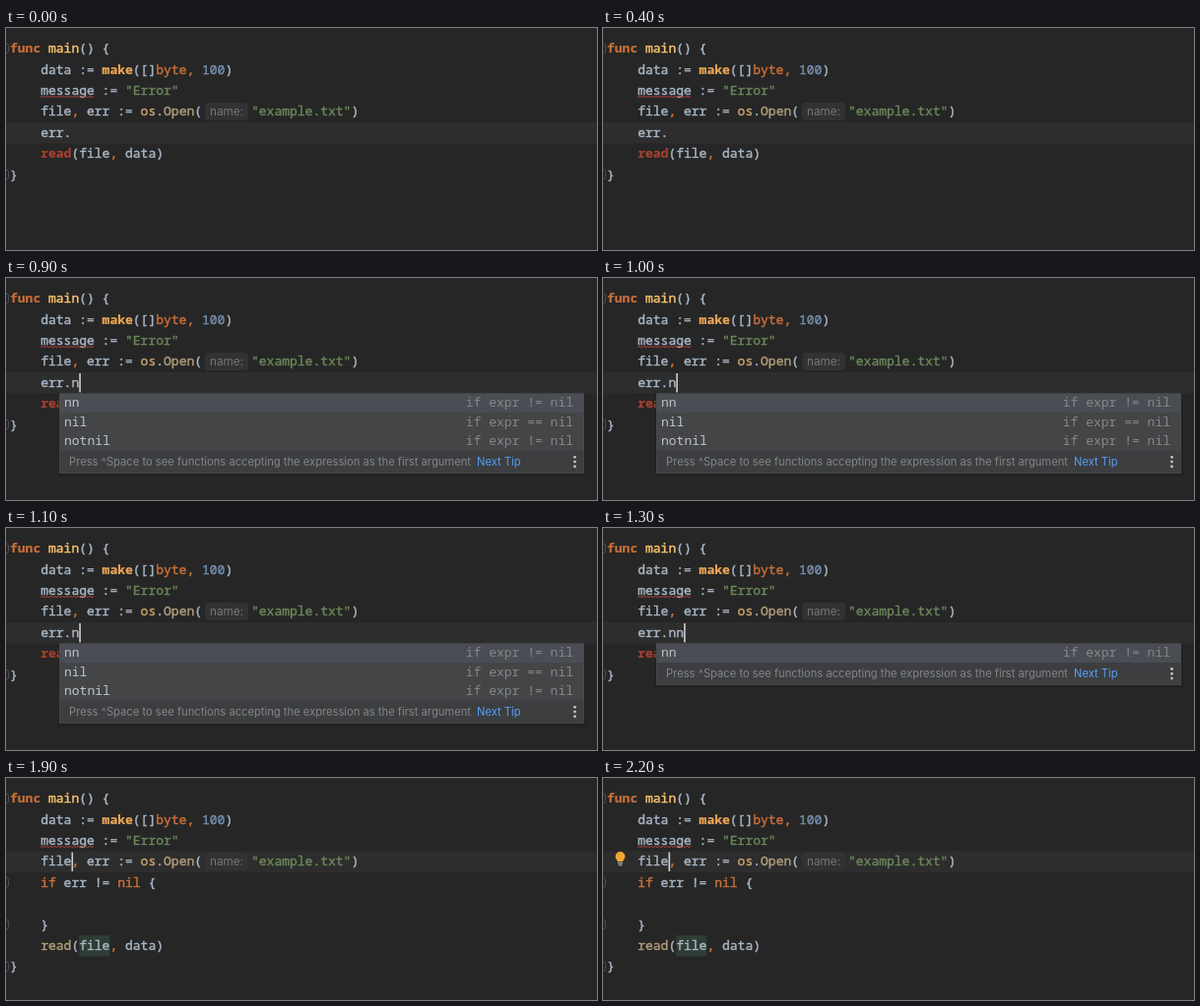
Animation of 600x226 px, one loop 2.4 s. Source, as an HTML page:

```html
<!DOCTYPE html>
<html lang="en">
<head>
<meta charset="utf-8">
<title>Postfix completion</title>
<style>
html, body { margin: 0; width: 100%; height: 100%; overflow: hidden; background: #262626; }
svg { display: block; width: 100vw; height: 100vh; }
text { white-space: pre; }
.code { font: 500 13px "Noto Sans Mono", "DejaVu Sans Mono", monospace; font-variant-ligatures: none; }
.editor { stroke-width: .4px; }
.strong { font-weight: 700; stroke-width: .2px; }
.ui { font-family: Inter, Roboto, sans-serif; }
</style>
</head>
<body>
<svg id="stage" viewBox="0 0 600 226" preserveAspectRatio="xMinYMin meet"></svg>
<script>
const LOOP = 2400, LEFT = 4, CHAR = 7.8, TOP = 10.4, LINE = 21.4;
const C = {
  text: '#a9b7c6', key: '#cc7038', decl: '#ffc66d', builtin: '#eda757', call: '#b09d79',
  pkg: '#c9a46c', string: '#6a8759', number: '#7590ae', error: '#a8402f'
};
const BOLD = new Set(['func ', 'make', 'read']);
const stage = document.getElementById('stage');

const colX = col => LEFT + col * CHAR;
const rowY = row => TOP + row * LINE;
const escapeXml = s => s.replace(/&/g, '&amp;').replace(/</g, '&lt;');
const rect = (x, y, w, h, fill, extra = '') =>
  `<rect x="${x}" y="${y}" width="${w}" height="${h}" fill="${fill}" ${extra}/>`;

// Parts alternate between string and colour.
function code(x, y, ...parts) {
  let spans = '';
  for (let i = 0; i < parts.length; i += 2) {
    const [s, color] = [parts[i], parts[i + 1]];
    const strong = BOLD.has(s) && color !== C.call ? 'class="strong"' : '';
    spans += `<tspan ${strong} fill="${color}" stroke="${color}">${escapeXml(s)}</tspan>`;
  }
  return `<text class="code editor" x="${x}" y="${y}">${spans}</text>`;
}
const line = (row, col, ...parts) => code(colX(col), rowY(row) + 14.7, ...parts);
const item = (x, y, fill, s) => `<text class="code" x="${x}" y="${y}" fill="${fill}">${s}</text>`;
const ui = (x, y, size, fill, s) =>
  `<text class="ui" x="${x}" y="${y}" font-size="${size}" fill="${fill}">${s}</text>`;
const caret = (row, col) => rect(colX(col) + 0.1, rowY(row) + 1, 1.6, LINE - 2, '#d0d0d0');
const fold = row => rect(-6, rowY(row) + 5.6, 8.5, 9.5, 'none', 'rx="2" stroke="#4c4e50"');

function wave(row, col, count, color) {
  const y = rowY(row) + 17.6;
  let d = `M${colX(col)} ${y}`;
  for (let i = 1; i <= count * CHAR / 2; i++) d += `l2 ${i % 2 ? -1.6 : 1.6}`;
  return `<path d="${d}" fill="none" stroke="${color}" stroke-width="1"/>`;
}

function popup(items) {
  const x = 54, y = 117.6, w = 533, rowH = 19.4, footerY = y + items.length * rowH;
  const h = items.length * rowH + 23;
  let out = rect(x - 1, y + 1, w + 3, h + 2, '#1d1d1d', 'opacity=".4"') +
    rect(x, y, w, h, '#434547') + rect(x, y, w, rowH, '#4b4d54') +
    rect(x, footerY, w, 23, '#3c3e40');
  items.forEach(([name, hint], i) => {
    const base = y + i * rowH + 13.6;
    out += item(59, base, '#c0c3c6', name) +
      item(576 - hint.length * CHAR, base, '#858789', hint);
  });
  out += ui(64, footerY + 15, 11.2, '#838587',
    'Press ^Space to see functions accepting the expression as the first argument');
  out += ui(478, footerY + 15, 11.2, '#589df6', 'Next Tip');
  for (const dy of [6.5, 11.3, 16.1]) {
    out += `<circle cx="577.5" cy="${footerY + dy}" r="1.4" fill="#c4c6c8"/>`;
  }
  return out + rect(x + 0.5, y + 0.5, w - 1, h - 1, 'none', 'stroke="#4c4e50" stroke-width=".6"');
}

const bulb = () =>
  '<path d="M15 85.2c0-1.7-2.4-2.5-2.4-5.3a4.9 4.9 0 0 1 9.8 0c0 2.8-2.4 3.6-2.4 5.3z" fill="#f0a732"/>' +
  rect(15, 86, 5, 1.3, '#a5a8ab') + rect(15.6, 88, 3.8, 1.2, '#a5a8ab');

function scene(t) {
  const expanded = t >= 1400, analysed = t >= 1500;
  const typed = expanded || t < 900 ? '' : t < 1200 ? 'n' : 'nn';
  const last = expanded ? 8 : 6;
  const readColor = analysed ? C.call : expanded ? '#c4352c' :
    t >= 600 && t < 900 ? '#b04a30' : C.error;

  let out = rect(0, 0, 600, 226, '#262626') +
    rect(0, rowY(expanded ? 3 : 4), 600, LINE, '#2d2d2d');
  if (expanded) out += rect(colX(9), rowY(7), 4 * CHAR, LINE, '#2f3d35');
  out += fold(0) + fold(last);
  if (analysed) out += fold(4) + fold(6);

  out += line(0, 0, 'func ', C.key, 'main', C.decl, '() {', C.text);
  out += line(1, 4, 'data := ', C.text, 'make', C.builtin, '([]', C.text,
    'byte, ', C.key, '100', C.number, ')', C.text);
  out += line(2, 4, 'message := ', C.text, '"Error"', C.string) + wave(2, 4, 7, '#b5443a');
  out += line(3, 4, 'file', C.text, ', ', C.key, 'err := ', C.text,
    'os', C.pkg, '.', C.text, 'Open', C.call, '(', C.text);
  out += rect(202, 76, 44, 18, '#313233', 'rx="4"') + ui(207, 89, 11.7, '#747678', 'name:');
  out += code(249, rowY(3) + 14.7, '"example.txt"', C.string, ')', C.text);

  if (expanded) {
    out += line(4, 4, 'if ', C.key, 'err != ', C.text, 'nil', analysed ? C.key : C.text, ' {', C.text);
    out += line(6, 4, '}', C.text);
  } else {
    out += line(4, 4, 'err.' + typed, C.text);
  }
  out += line(last - 1, 4, 'read', readColor, '(file', C.text, ', ', C.key, 'data)', C.text);
  out += line(last, 0, '}', C.text);

  if (expanded) out += caret(3, 8);
  if (typed) {
    out += caret(4, 8 + typed.length);
    const items = [['nn', 'if expr != nil']];
    if (typed === 'n') items.push(['nil', 'if expr == nil'], ['notnil', 'if expr != nil']);
    out += popup(items);
  }
  if (t >= 2100) out += bulb();
  return out;
}

const start = performance.now();
let shown = '';
function draw() {
  const next = scene((performance.now() - start) % LOOP);
  if (next !== shown) stage.innerHTML = shown = next;
  requestAnimationFrame(draw);
}
draw();
</script>
</body>
</html>
```
